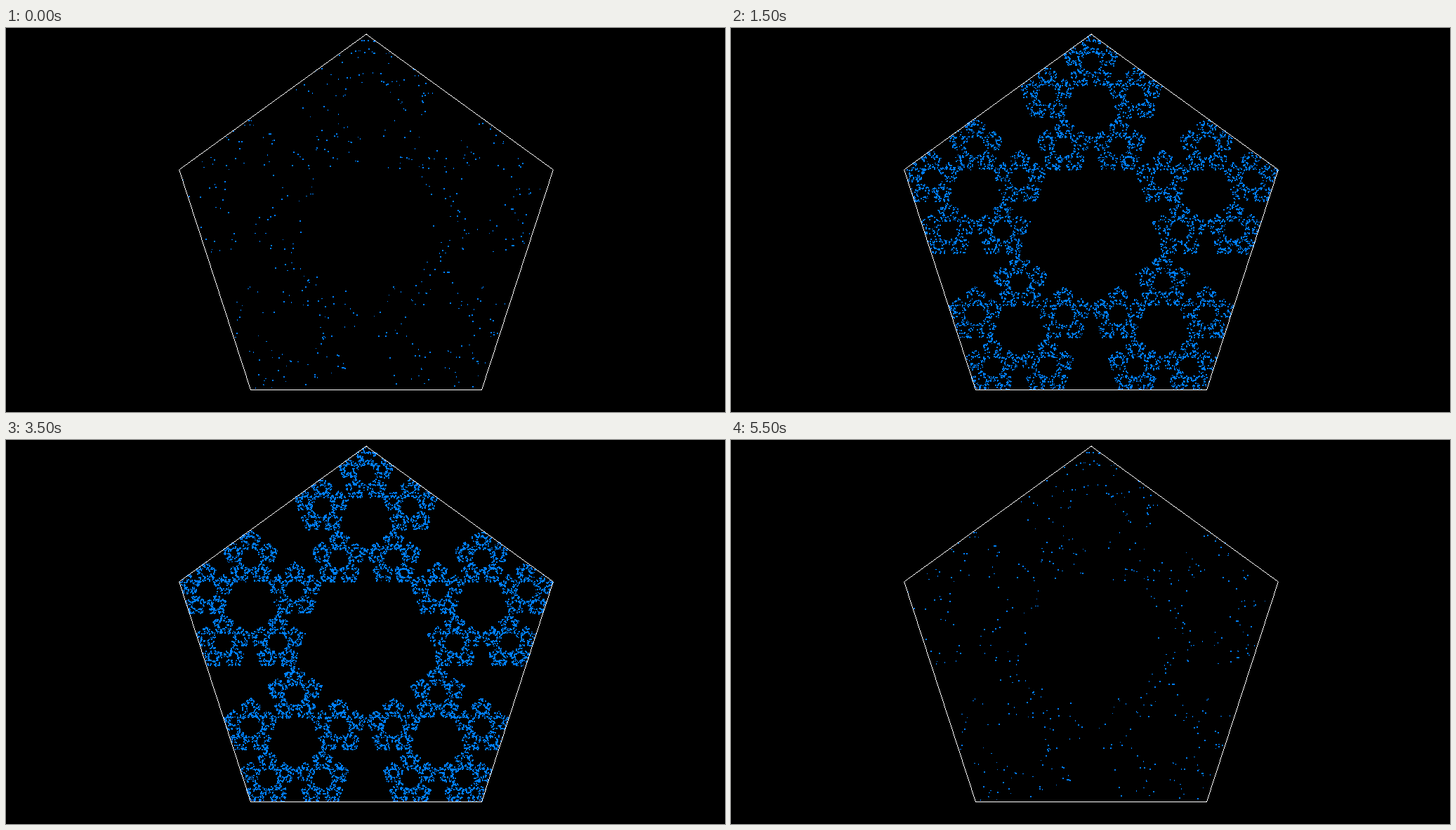
An HTML page with a canvas for the animation above (6000 ms loop, 1024 by 547 pixels).

```html
<!DOCTYPE html>
<html lang="en">
<head>
<meta charset="utf-8">
<title>Pentagon chaos game</title>
<style>
  html, body { margin: 0; width: 100%; height: 100%; overflow: hidden; background: #000; }
  canvas { display: block; width: 1024px; height: 547px; }
</style>
</head>
<body>
<canvas width="1024" height="547"></canvas>
<script>
const STEP = 500;
const DOT = 1.7;
const RATIO = (3 - Math.sqrt(5)) / 2;
const COUNTS = [500, 2000, 5000, 10000, 15000, 20000];
const corners = [[513, 8.5], [779.5, 202], [677.5, 515.5], [348.5, 515.5], [246.5, 202]];
const ctx = document.querySelector('canvas').getContext('2d');

function seeded(seed) {
  return () => {
    seed = (seed + 0x6d2b79f5) | 0;
    let t = Math.imul(seed ^ (seed >>> 15), 1 | seed);
    t = (t + Math.imul(t ^ (t >>> 7), 61 | t)) ^ t;
    return ((t ^ (t >>> 14)) >>> 0) / 4294967296;
  };
}

// Each jump lands near a random corner, which builds the pentaflake.
function chaosGame(count) {
  const random = seeded(11);
  const points = [];
  let [x, y] = corners[0];
  for (let i = -20; i < count; i++) {
    const [cx, cy] = corners[Math.floor(random() * 5)];
    x = cx + (x - cx) * RATIO;
    y = cy + (y - cy) * RATIO;
    if (i >= 0) points.push([x, y]);
  }
  return points;
}

// Crisp dot: its edges snap to whole pixels.
function dot([x, y]) {
  const left = Math.round(x - DOT / 2);
  const top = Math.round(y - DOT / 2);
  ctx.fillRect(left, top, Math.round(x + DOT / 2) - left, Math.round(y + DOT / 2) - top);
}

// Line one pixel thick, without antialiasing.
function line([x0, y0], [x1, y1]) {
  const n = Math.round(Math.max(Math.abs(x1 - x0), Math.abs(y1 - y0)));
  for (let i = 0; i <= n; i++) {
    const x = x0 + (x1 - x0) * i / n;
    const y = y0 + (y1 - y0) * i / n;
    ctx.fillRect(Math.floor(x), Math.floor(y), 1, 1);
  }
}

const points = chaosGame(COUNTS[COUNTS.length - 1]);

function draw(level) {
  ctx.clearRect(0, 0, 1024, 547);
  ctx.fillStyle = '#0080ff';
  points.slice(0, COUNTS[level]).forEach(dot);
  ctx.fillStyle = '#fff';
  corners.forEach((corner, i) => line(corner, corners[(i + 1) % corners.length]));
}

// Levels climb to the fullest, then come back down.
let shown = -1;
function tick() {
  const step = Math.floor(performance.now() / STEP) % (2 * COUNTS.length);
  const level = Math.min(step, 2 * COUNTS.length - 1 - step);
  if (level !== shown) draw(shown = level);
  requestAnimationFrame(tick);
}
tick();
</script>
</body>
</html>
```
